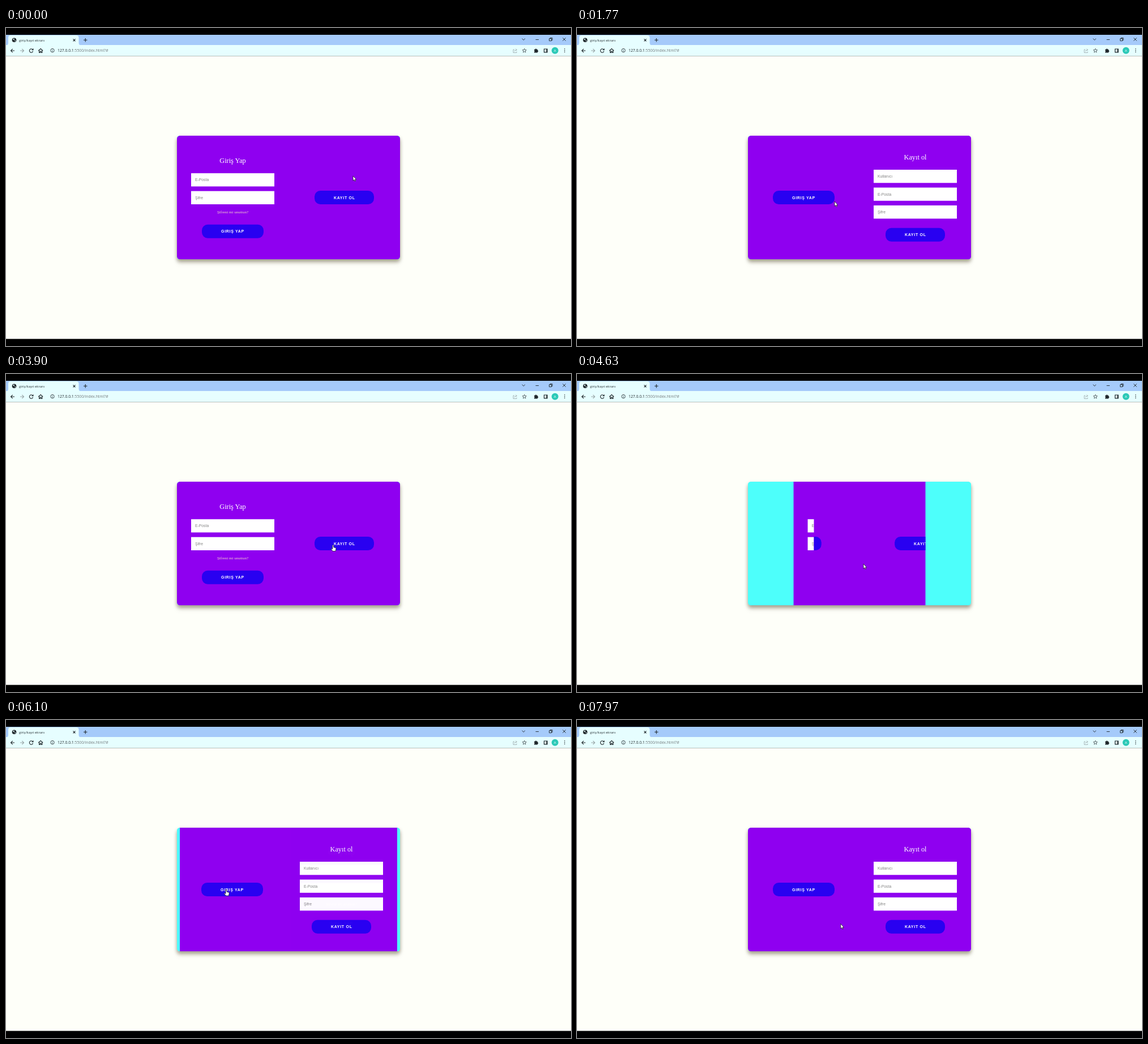
An HTML page for the animation above (8 s loop, 998 by 561 pixels).

```html
<!DOCTYPE html>
<html lang="tr">
<head>
<meta charset="utf-8">
<title>giriş/kayıt ekranı</title>
<style>
  html, body { margin: 0; width: 100%; height: 100%; overflow: hidden; background: #000; }
  svg { display: block; width: 100vw; height: 100vh; }
  .ui { font-family: "Open Sans", sans-serif; }
  .title { font: 12.3px "Liberation Serif", serif; fill: #fff; text-anchor: middle; }
  .link { font: 7.1px "Liberation Serif", serif; fill: #f4d3c8; text-anchor: middle; }
  .hint { font: 6.8px "Liberation Sans", sans-serif; fill: #858585; }
  .label { font: bold 7px "Liberation Sans", sans-serif; letter-spacing: .7px; fill: #fff; }
  .purple { fill: #8f00f0; }
  .icon { fill: none; stroke: #20282c; stroke-width: 1.1; }
  .faint { stroke: #98a4a6; }
  #shadow { filter: drop-shadow(0 5px 3px rgba(40, 30, 0, .28)) drop-shadow(0 3px 3px rgba(60, 45, 0, .22)); }
</style>
</head>
<body>
<svg viewBox="0 0 998 561" preserveAspectRatio="none">
  <defs>
    <clipPath id="cardClip"><rect x="302" y="190" width="394" height="218" rx="5.2"/></clipPath>
    <clipPath id="overlayClip"><rect id="overlayWindow" y="190" width="197" height="218"/></clipPath>
  </defs>

  <!-- browser window -->
  <rect y="12" width="998" height="18.5" fill="#a5cafa"/>
  <path d="M0 30.500Q4 30.500 4 26V17Q4 13 8 13H124Q128.500 13 128.500 17V26Q128.500 30.500 133 30.500Z" fill="#e6feff"/>
  <rect y="30" width="998" height="19.500" fill="#e6feff"/>
  <rect y="49.500" width="998" height="499" fill="#fefff9"/>
  <circle cx="14.500" cy="21.300" r="3.800" fill="#20282c"/>
  <path d="M12 20l2-1.500 1 1.500-1 1.500zM15 22.500l2-1-.5 2.200z" fill="#e6feff"/>
  <g class="ui">
    <text x="23" y="23.500" font-size="5.900" fill="#2b3437">giriş/kayıt ekranı</text>
    <text x="91" y="42.200" font-size="6.800" fill="#73797b"><tspan fill="#22292c">127.0.0.1</tspan>:5500/index.html?#</text>
  </g>
  <g class="icon">
    <path d="M118.500 19.300l4 4m0-4l-4 4M137 21.300h6.500m-3.250-3.250v6.500"/>
    <path d="M911.500 18.700l2.700 2.600 2.700-2.600M935.500 20.500h5.500M983.300 17.300l5.400 5.400m0-5.400l-5.400 5.400" stroke-width=".9"/>
    <path d="M959.500 18.700h4v4h-4zM961 18.500v-1h4v4h-1.200" stroke-width=".9"/>
    <path d="M15 40H8.500m3.200-3.200L8.500 40l3.200 3.200"/>
    <path class="faint" d="M25 40h6.500m-3.200-3.200l3.200 3.200-3.200 3.200"/>
    <path d="M47.200 38.200a3.200 3.200 0 1 0 .4 2.800M48 36.300v2.500h-2.600"/>
    <path d="M57.300 40l3.900-3.500 3.900 3.500M58.600 39.500v3.900h1.700v-2.400h1.800v2.400h1.700v-3.900"/>
    <path d="M82 39.300v2.400m0-4.200v.9" stroke-width=".8"/>
    <circle cx="82" cy="39.600" r="3.200" stroke-width=".8"/>
    <path class="faint" d="M898 38h-2v5.500h6v-2M898 41.500q.5-3 4-3m-1.700-2l2 2-2 2" stroke-width=".8"/>
    <path d="M915.700 36.300l1 2.300 2.500.2-1.900 1.700.6 2.500-2.200-1.400-2.200 1.400.6-2.500-1.900-1.700 2.500-.2z" stroke-width=".7"/>
    <path d="M950.500 37h5.500v5.800h-5.500zM955 37v5.800" stroke-width="1.200"/>
  </g>
  <path d="M933 37.800h1.800a1.200 1.200 0 0 1 2.400 0h1.800v1.800a1.200 1.200 0 0 1 0 2.400v1.500h-6v-1.700a1.200 1.200 0 0 0 0-2.200z" fill="#20282c"/>
  <circle cx="969.700" cy="39.700" r="6" fill="#2bc9b7"/>
  <text class="ui" x="969.700" y="41.900" font-size="6" fill="#fff" text-anchor="middle">A</text>
  <path d="M986.700 36.300v1.300m0 1.400v1.300m0 1.400v1.300" stroke="#20282c" stroke-width="1.300"/>

  <!-- login card -->
  <rect id="shadow" x="302" y="190" width="394" height="218" rx="5.200" fill="#4dfffb"/>
  <g clip-path="url(#cardClip)">
    <rect x="302" y="190" width="394" height="218" fill="#4dfffb"/>
    <g id="signIn"></g>
    <g id="signUp"></g>
    <g clip-path="url(#overlayClip)">
      <rect class="purple" x="302" y="190" width="394" height="218"/>
      <g id="leftPanel"></g>
      <g id="rightPanel"></g>
    </g>
  </g>

  <g id="cursor" stroke="#111" stroke-width=".7" stroke-linejoin="round" fill="#fff">
    <path id="arrow" d="M0 0V8.300L1.900 6.600 3.200 9.500 4.500 8.900 3.200 6.200H5.700Z"/>
    <path id="hand" d="M-1 1Q0-.8 1 1V4.300L4.300 5Q5.300 5.300 5.200 6.500L4.400 11H-.6L-3.300 7.600Q-3.800 6.300-2.500 6.500L-1 7.600Z"/>
  </g>
</svg>

<script>
const LOOP = 8000, SLIDE = 600, HALF = 197;
const $ = id => document.getElementById(id);

const button = (x, y, width, label) =>
  `<rect x="${x}" y="${y}" width="${width}" height="24" rx="10.2" fill="#2900f1"/>
   <text class="label" x="${x + 34}" y="${y + 14.500}">${label}</text>`;
const field = (y, hint) =>
  `<rect x="327" y="${y}" width="147" height="23.300" fill="#fff"/>
   <text class="hint" x="334" y="${y + 14.200}">${hint}</text>`;
const form = (title, titleY, body) =>
  `<rect class="purple" x="302" y="190" width="${HALF}" height="218"/>
   <text class="title" x="400.500" y="${titleY}">${title}</text>${body}`;

$('signIn').innerHTML = form('Giriş Yap', 238,
  field(256.200, 'E-Posta') + field(287.700, 'Şifre') +
  '<text class="link" x="400.500" y="326.800">Şifreni mi unuttun?</text>' +
  button(346, 346.800, 109, 'GIRIŞ YAP'));
$('signUp').innerHTML = form('Kayıt ol', 232,
  field(250, 'Kullanıcı') + field(281.500, 'E-Posta') + field(313, 'Şifre') +
  button(348, 352.800, 105, 'KAYIT OL'));
$('leftPanel').innerHTML = button(346, 287, 109, 'GIRIŞ YAP');
$('rightPanel').innerHTML = button(545, 287, 105, 'KAYIT OL');

// Clicks alternate: open sign-up, back to sign-in, ...
const clicks = [900, 2687, 4363, 6033, 7350];

// Cursor path: time, x, y
const path = [
  [0, 613, 261], [500, 604, 291], [900, 598, 297], [1200, 506, 335],
  [1770, 455, 306], [2000, 418, 300], [3100, 416, 300], [3500, 470, 314],
  [4000, 590, 300], [4363, 596, 298], [4630, 506, 335], [5200, 440, 326],
  [5600, 392, 300], [6100, 389, 299], [6400, 460, 315], [6770, 586, 318],
  [7050, 597, 300], [7350, 597, 299], [7620, 508, 335], [8000, 465, 360]
];

// cubic-bezier(.42, 0, .58, 1)
function easeInOut(x) {
  let low = 0, high = 1;
  for (let i = 0; i < 24; i++) {
    const s = (low + high) / 2, r = 1 - s;
    if (1.26 * r * r * s + 1.74 * r * s * s + s ** 3 < x) low = s; else high = s;
  }
  return low * low * (3 - 2 * low);
}

function cursorAt(t) {
  const i = path.findIndex(point => point[0] > t);
  const [t0, x0, y0] = path[i - 1], [t1, x1, y1] = path[i];
  const u = (t - t0) / (t1 - t0), k = u * u * (3 - 2 * u);
  return [x0 + (x1 - x0) * k, y0 + (y1 - y0) * k];
}

const move = (id, x, y = 0) => $(id).setAttribute('transform', `translate(${x} ${y})`);

function drawCard(t) {
  const count = clicks.filter(click => click <= t).length;
  const opening = count % 2 === 1;
  const linear = count ? Math.min(1, (t - clicks[count - 1]) / SLIDE) : 1;
  const eased = easeInOut(linear);
  const open = opening ? eased : 1 - eased;
  const shift = HALF * open;

  move('signIn', shift);
  move('signUp', shift);
  // Opening swaps the forms halfway; closing fades until the stacking order flips.
  $('signUp').setAttribute('opacity', opening ? +(linear >= .5) : eased < .625 ? open : 0);
  $('overlayWindow').setAttribute('x', 499 - shift);
  move('leftPanel', -.2 * HALF * (1 - open));
  move('rightPanel', .2 * HALF * open);
}

function drawCursor(t) {
  const [x, y] = cursorAt(t);
  const onButton = y > 287 && y < 311 && (x > 346 && x < 454 || x > 545 && x < 650);
  move('cursor', x, y);
  $('hand').style.display = onButton ? '' : 'none';
  $('arrow').style.display = onButton ? 'none' : '';
}

function frame() {
  const t = performance.now() % LOOP;
  drawCard(t);
  drawCursor(t);
  requestAnimationFrame(frame);
}
frame();
</script>
</body>
</html>
```
